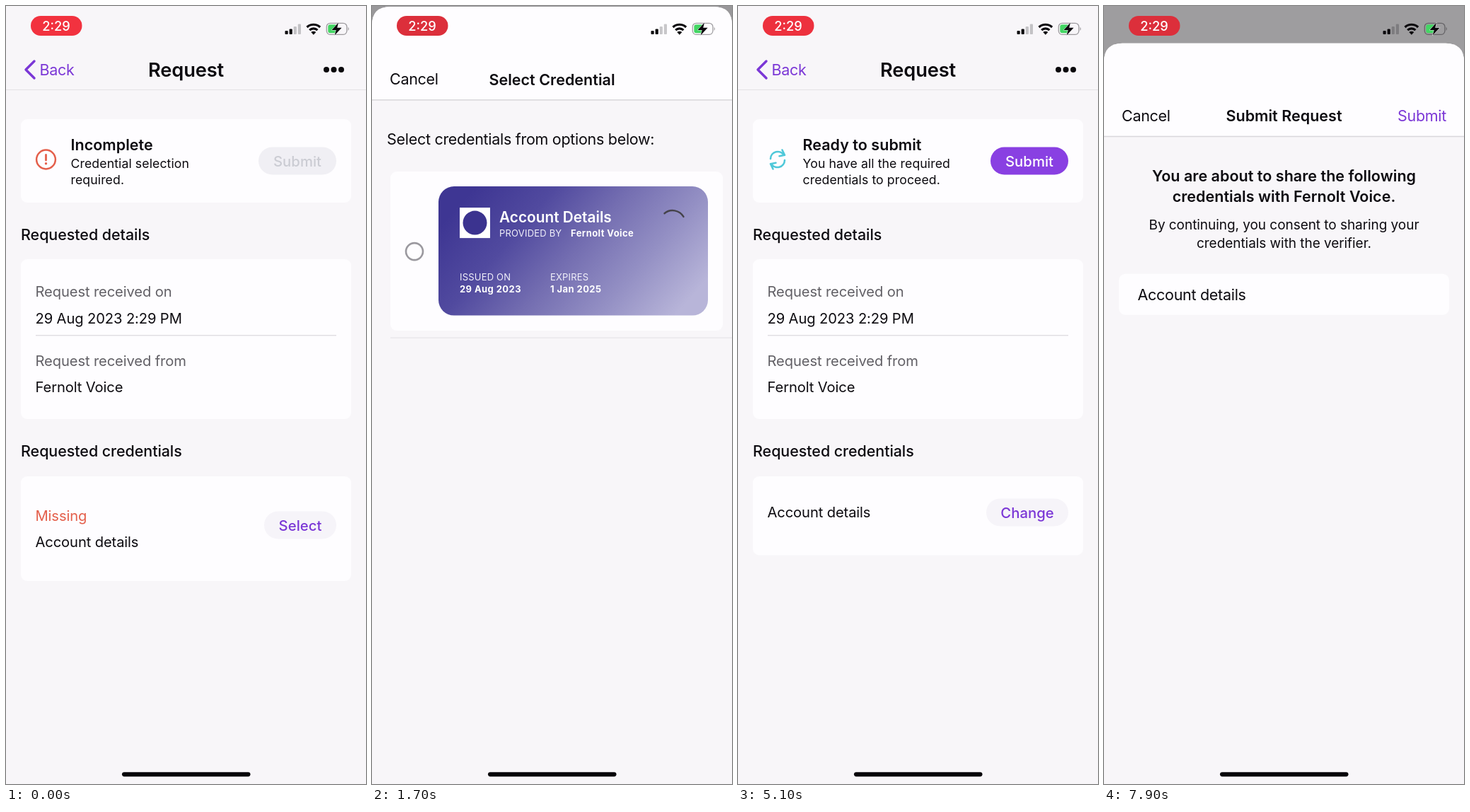
Write an HTML page that moves like this. It is 509 px wide and 1100 px high and loops after 8 s.

```html
<!DOCTYPE html>
<html lang="en">
<head>
<meta charset="utf-8">
<title>Credential request</title>
<style>
  html, body { margin: 0; width: 100%; height: 100%; overflow: hidden; background: #f8f6f9; }
  svg { display: block; width: 100%; height: 100%; }
  text { font-family: Inter, Roboto, sans-serif; font-optical-sizing: none; fill: #0d0b10; }
  .title { font-size: 27.3px; font-weight: 600; letter-spacing: -.15px; }
  .nav { font-size: 21.5px; letter-spacing: -.29px; }
  .bold { font-size: 21.5px; font-weight: 600; letter-spacing: .03px; }
  .head { font-size: 21.5px; font-weight: 500; letter-spacing: -.07px; }
  .row { font-size: 20.2px; letter-spacing: -.13px; }
  .note { font-size: 17.7px; letter-spacing: .08px; }
  .btn { font-size: 20.3px; font-weight: 500; letter-spacing: .05px; text-anchor: middle; }
  .body { font-size: 19px; letter-spacing: -.05px; }
  .card { font-size: 20.8px; font-weight: 600; fill: #fff; }
  .cap { font-size: 13px; letter-spacing: .2px; fill: #f1f0fa; }
  .val { font-size: 13px; font-weight: 700; letter-spacing: .42px; fill: #fff; }
  .clock { font-size: 18.3px; font-weight: 500; fill: #fff; text-anchor: middle; }
  .mid { text-anchor: middle; }
  .line { fill: none; stroke-linecap: round; stroke-linejoin: round; }
</style>
</head>
<body>
<svg id="stage" viewBox="0 0 509 1100" preserveAspectRatio="none"></svg>
<script>
const PURPLE = '#7b37d6', BG = '#f8f6f9', PANEL = '#fefdff', ISSUER = 'Fernolt Voice';
const LOOP = 8000;

const text = (x, y, cls, s, fill) =>
  `<text x="${x}" y="${y}" class="${cls}"${fill ? ` style="fill:${fill}"` : ''}>${s}</text>`;
const rect = (x, y, w, h, fill, r = 0, more = '') =>
  `<rect x="${x}" y="${y}" width="${w}" height="${h}" rx="${r}" fill="${fill}" ${more}/>`;
const circle = (x, y, r, fill, more = '') =>
  `<circle cx="${x}" cy="${y}" r="${r}" fill="${fill}" ${more}/>`;
const line = (d, color, w, more = '') =>
  `<path class="line" d="${d}" stroke="${color}" stroke-width="${w}" ${more}/>`;
const group = (id, body) => `<g id="${id}">${body}</g>`;
const panel = (y, h, id = '') => rect(21, y, 467, h, PANEL, 9, id && `id="${id}"`);
const button = (x, y, w, fill, label, color) =>
  rect(x, y, w, 39, fill, 19.5) + text(x + w / 2, y + 27, 'btn', label, color);

const page =
  rect(0, 0, 509, 1100, BG) +
  line('M40 78 28 90 40 102', PURPLE, 3.4) + text(47.5, 97.5, 'nav', 'Back', PURPLE) +
  text(254.5, 100, 'title mid', 'Request') +
  [453, 463.5, 474].map(x => circle(x, 90, 4, '#0a080c')).join('') +
  rect(0, 118, 509, 1, '#e3e1e5') +
  panel(160, 118) +
  group('incomplete',
    circle(56.5, 217, 13.4, 'none', 'stroke="#e45f4b" stroke-width="2.5"') +
    line('M56.5 210.5V218', '#e45f4b', 2.8) + circle(56.5, 222.8, 1.7, '#e45f4b') +
    text(91.5, 203.5, 'bold', 'Incomplete') +
    text(91.5, 228.5, 'note', 'Credential selection') + text(91.5, 251.5, 'note', 'required.') +
    button(357, 199.5, 110, '#f0eff4', 'Submit', '#cbccd3')) +
  group('ready',
    line('M46 216A10.2 10.2 0 0 1 65 211M62.5 203.5 66 210.8 58.5 212.3' +
         'M66 218A10.2 10.2 0 0 1 47 223M49.5 230.5 46 223.2 53.5 221.7', '#4fc8d9', 2.6) +
    text(91.5, 203.5, 'bold', 'Ready to submit') +
    text(91.5, 228.5, 'note', 'You have all the required') +
    text(91.5, 251.5, 'note', 'credentials to proceed.') +
    button(357, 199.5, 110, '#8940e2', 'Submit', '#fff')) +
  text(21, 331.3, 'head', 'Requested details') +
  panel(358, 226) +
  text(41.5, 411, 'row', 'Request received on', '#626066') +
  text(41.5, 448.5, 'row', '29 Aug 2023 2:29 PM') +
  rect(42, 465, 425, 1.4, '#dfdde1') +
  text(41.5, 508.8, 'row', 'Request received from', '#626066') +
  text(41.5, 546.3, 'row', ISSUER) +
  text(21, 637.3, 'head', 'Requested credentials') +
  panel(665, 148, 'account') +
  group('missing',
    text(41.5, 727.5, 'row', 'Missing', '#e45f4b') + text(41.5, 765.3, 'row', 'Account details') +
    button(365, 714.5, 102, '#f6f4f9', 'Select', PURPLE)) +
  group('chosen',
    text(41.5, 723.3, 'row', 'Account details') +
    button(351, 696.5, 116, '#f6f4f9', 'Change', PURPLE));

const sheet = (id, title, body) => group(id,
  `<path d="M0 1120V26Q0 0 26 0H483Q509 0 509 26V1120Z" fill="${BG}"/>` +
  `<path d="M0 131V26Q0 0 26 0H483Q509 0 509 26V131Z" fill="${PANEL}"/>` +
  rect(0, 131, 509, 1.5, '#d9d7db') +
  text(25, 110.3, 'nav', 'Cancel') + text(254.5, 110.5, 'bold mid', title) + body);

const picker = sheet('picker', 'Select Credential',
  text(21, 195.3, 'nav', 'Select credentials from options below:') +
  rect(0, 223, 509, 245, '#dcdade', 0, 'id="pressed"') +
  rect(26, 467.5, 483, 1, '#e2e0e4') +
  rect(26, 233, 470, 225, PANEL, 9) +
  circle(60, 346, 12, 'none', 'id="radio" stroke-width="2.6"') +
  circle(60, 346, 3.6, PURPLE, 'id="pip"') +
  rect(94, 254, 381, 182.5, 'url(#indigo)', 22) +
  rect(124, 284, 43, 43, '#fff') + circle(145.5, 305.5, 17, '#3b338f') +
  text(180, 305.3, 'card', 'Account Details') +
  text(180, 325, 'cap', 'PROVIDED BY') + text(281, 325, 'val', ISSUER) +
  text(124, 387.3, 'cap', 'ISSUED ON') + text(124, 404.3, 'val', '29 Aug 2023') +
  text(252, 387.3, 'cap', 'EXPIRES') + text(252, 404.3, 'val', '1 Jan 2025') +
  line('M-11.6 -13.8A18 18 0 0 1 15.4 -9.3', '#45434a', 2.4, 'id="spinner"') +
  group('badge',
    '<path d="M416 309H437V332L426.5 325 416 332Z" fill="#c5c2e2"/>' +
    circle(426.5, 298.5, 14.5, '#fff') + line('M420.5 299 424.8 303.2 432.5 294.5', '#8d88c0', 2.2)));

const confirm = sheet('confirm', 'Submit Request',
  `<text x="484" y="110.3" class="nav" text-anchor="end" style="fill:${PURPLE}">Submit</text>` +
  text(254.5, 195, 'bold mid', 'You are about to share the following') +
  text(254.5, 224, 'bold mid', `credentials with ${ISSUER}.`) +
  text(254.5, 263, 'body mid', 'By continuing, you consent to sharing your') +
  text(254.5, 289, 'body mid', 'credentials with the verifier.') +
  panel(326, 58) + text(47.5, 363.5, 'nav', 'Account details'));

const status =
  rect(35, 14, 72.5, 28, '#f2333f', 14, 'id="pill"') + text(71, 34.6, 'clock', '2:29') +
  [5, 7.5, 11, 14.5].map((h, i) =>
    rect(394.5 + i * 6.1, 40 - h, 4.2, h, '#0a080c', 1, i > 1 ? 'opacity=".22"' : '')).join('') +
  '<g fill="none" stroke="#0a080c" stroke-width="3.2">' +
  '<path d="M425.5 30A13.4 13.4 0 0 1 444.1 30M429.2 34.2A8 8 0 0 1 440.4 34.2"/></g>' +
  '<path d="M434.8 40.7 431.3 37.1A5 5 0 0 1 438.3 37.1Z" fill="#0a080c"/>' +
  rect(453.3, 24.3, 28.6, 16, 'none', 5, 'stroke="#0a080c" stroke-opacity=".38" stroke-width="1.3"') +
  rect(455.3, 26.3, 13, 12, '#43d663', 3) +
  '<path d="M483.6 29.5Q486 32.3 483.6 35.1Z" fill="#0a080c" opacity=".42"/>' +
  `<path d="M470 23.5 460.5 34H466.7L464.6 41.5 474.6 30.7H468.2Z" fill="#0a080c" stroke="${BG}" stroke-width="1" paint-order="stroke"/>`;

const stage = document.getElementById('stage');
stage.innerHTML =
  '<defs><linearGradient id="indigo" gradientUnits="userSpaceOnUse" x1="150" y1="250" x2="400" y2="470">' +
  '<stop stop-color="#3e3693"/><stop offset=".26" stop-color="#514a9f"/>' +
  '<stop offset=".5" stop-color="#746eb1"/><stop offset=".75" stop-color="#9490c4"/>' +
  '<stop offset="1" stop-color="#b8b5d9"/></linearGradient></defs>' +
  page + rect(0, 0, 509, 1100, '#000', 0, 'id="dim"') + picker + confirm + status +
  rect(164, 1083.2, 181.5, 6.2, '#08060a', 3.1) +
  group('touch', circle(0, 0, 15, '#17e8f7', 'stroke="#d9f6f8" stroke-width="1.6"'));

const el = {};
stage.querySelectorAll('[id]').forEach(n => el[n.id] = n);
const set = (id, name, value) => el[id].setAttribute(name, value);
const show = (id, on) => set(id, 'display', on ? 'inline' : 'none');
const clamp = v => Math.max(0, Math.min(1, v));

// Sheet easing: cubic-bezier(.32, .72, 0, 1) over half a second.
function slide(t, start) {
  const x = clamp((t - start) / 500);
  if (x === 0 || x === 1) return x;
  let lo = 0, hi = 1, s = .5;
  for (let i = 0; i < 24; i++) {
    s = (lo + hi) / 2;
    if (.96 * (1 - s) ** 2 * s + s ** 3 < x) lo = s; else hi = s;
  }
  return 2.16 * (1 - s) ** 2 * s + 3 * (1 - s) * s * s + s ** 3;
}

const taps = [
  { x: 416, y: 734.5, from: 600, to: 1450 },
  { x: 60, y: 345, from: 3050, to: 4250 },
  { x: 413, y: 219, from: 6650, to: 7700 }
];

function draw(t) {
  const pick = slide(t, 1250) - slide(t, 3897), ask = slide(t, 7656);
  const place = (id, p) => {
    show(id, p > 0);
    set(id, 'transform', `translate(0 ${(1100 * (1 - p)).toFixed(2)})`);
  };
  place('picker', pick);
  place('confirm', ask);
  set('dim', 'opacity', .385 * Math.max(pick, ask));

  const ready = t >= 4600;
  show('incomplete', !ready); show('missing', !ready);
  show('ready', ready); show('chosen', ready);
  set('account', 'height', ready ? 111.5 : 148);

  const loaded = t >= 2400, picked = t >= 3750;
  show('spinner', !loaded); show('badge', loaded);
  set('spinner', 'transform', `translate(425 306) rotate(${(t - 1700) * .36})`);
  show('pressed', picked); show('pip', picked);
  set('radio', 'stroke', picked ? PURPLE : '#9b999f');

  const glow = (1 + Math.cos(t / 2400 * 2 * Math.PI)) / 2;
  const mix = (a, b) => Math.round(a + (b - a) * glow);
  set('pill', 'fill', `rgb(${mix(207, 242)},${mix(46, 50)},${mix(56, 63)})`);

  const tap = taps.find(p => t >= p.from && t < p.to);
  show('touch', tap);
  if (tap) {
    const k = Math.min(clamp((t - tap.from) / 120), clamp((tap.to - t) / 120));
    set('touch', 'opacity', k);
    set('touch', 'transform', `translate(${tap.x} ${tap.y})`);
  }
}

const begin = performance.now();
function frame() {
  draw((performance.now() - begin) % LOOP);
  requestAnimationFrame(frame);
}
frame();
</script>
</body>
</html>
```
